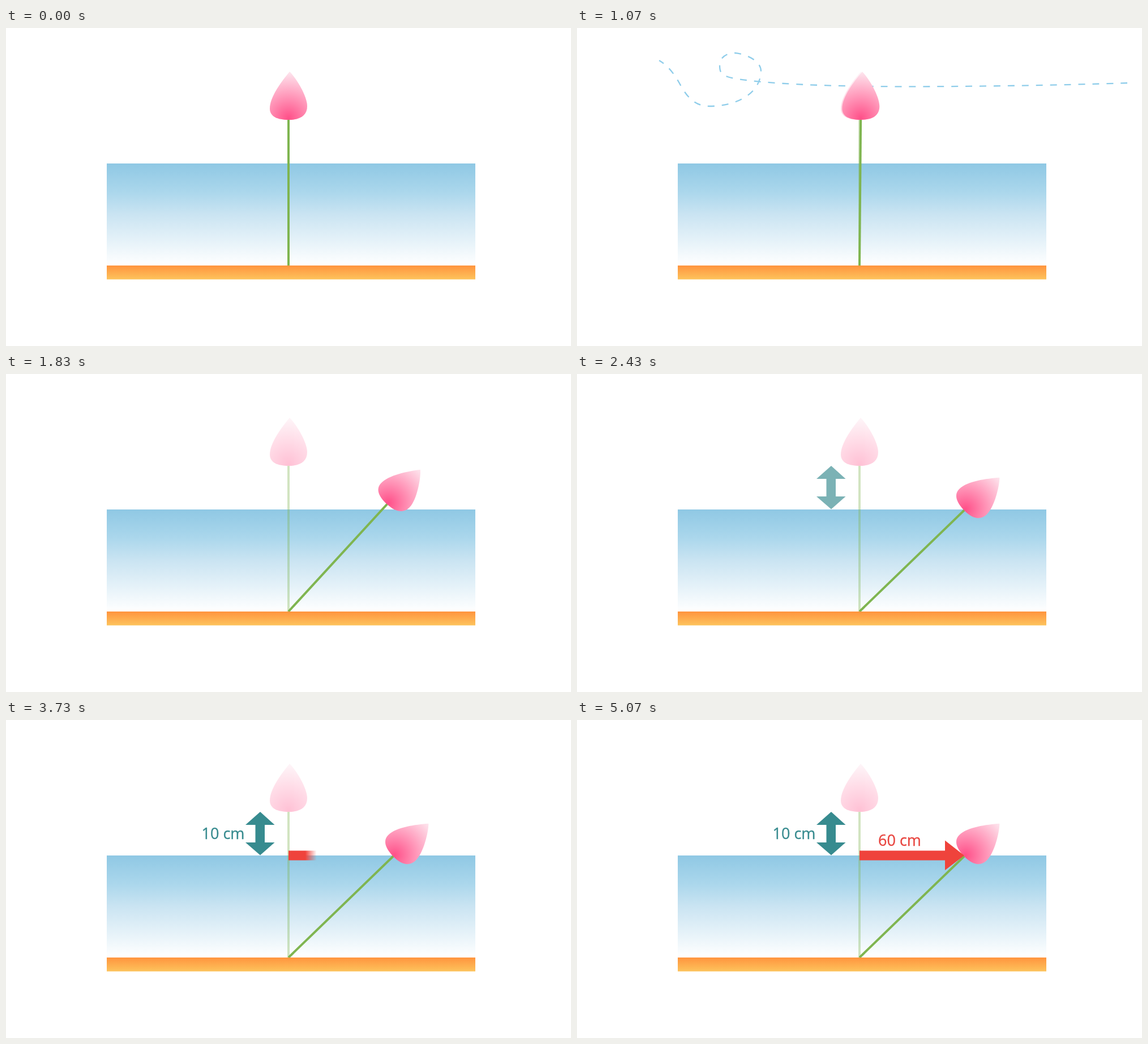
An HTML page that plays this animation: 998 by 561 pixels, repeating every 5.11 s.

```html
<!DOCTYPE html>
<html lang="en">
<head>
<meta charset="utf-8">
<title>Flower in the wind</title>
<style>
  html, body { margin: 0; width: 100%; height: 100%; overflow: hidden; background: #fff; }
  svg { display: block; width: 998px; height: 561px; }
  text { font: 27px "Open Sans", "Noto Sans", sans-serif; text-anchor: middle; stroke-width: .35; }
</style>
</head>
<body>
<svg viewBox="0 0 998 561">
  <defs>
    <linearGradient id="water" x2="0" y2="1">
      <stop offset="0" stop-color="#8fc8e4"/>
      <stop offset=".28" stop-color="#abd7ec"/>
      <stop offset=".5" stop-color="#cae4f2"/>
      <stop offset="1" stop-color="#fff"/>
    </linearGradient>
    <linearGradient id="soil" x2="0" y2="1">
      <stop offset="0" stop-color="#ff943e"/>
      <stop offset="1" stop-color="#fdc35c"/>
    </linearGradient>
    <radialGradient id="petal" gradientUnits="userSpaceOnUse" cx="499" cy="159" r="84">
      <stop offset="0" stop-color="#ff5089"/>
      <stop offset=".5" stop-color="#ff9dbd"/>
      <stop offset="1" stop-color="#fdeaf1"/>
    </radialGradient>
    <linearGradient id="edge" gradientUnits="userSpaceOnUse" y1="0" y2="0">
      <stop offset="0" stop-color="#fff"/>
      <stop offset="1" stop-color="#000"/>
    </linearGradient>
    <mask id="wipe" maskUnits="userSpaceOnUse" x="490" y="200" width="210" height="80">
      <rect x="490" y="200" width="210" height="80" fill="url(#edge)"/>
    </mask>
    <g id="plant">
      <path d="M499 161V419" stroke="#7fb550" stroke-width="4"/>
      <path fill="url(#petal)" d="M501 77C486 95 466 122 466 142C466 156 479 162 499 162C520 162 532 154 532 138C532 120 513 89 501 77Z"/>
    </g>
  </defs>

  <rect x="178" y="239" width="651" height="180" fill="url(#water)"/>
  <path id="wind" fill="none" stroke="#8fcdea" stroke-width="2.3" pathLength="1087"
    d="M143 56C163 67 175 86 184 103C196 124 210 138 234 138C278 138 324 118 325 76C325 57 296 45 278 44C262 44 252 54 252 65C252 80 256 82 266 86C295 95 400 103 570 103.3C700 103.5 850 101 972 97"/>
  <use href="#plant" opacity=".35"/>
  <use href="#plant" id="flower"/>
  <rect x="178" y="419" width="651" height="24.5" fill="url(#soil)"/>

  <path id="rise" fill="#378b8f" d="M449 162L474.5 185H457V216H474.5L449 238.5L423 216H440.5V185H423Z"/>
  <path fill="#ef433c" mask="url(#wipe)" d="M499 230.5H650V212.5L684 239L650 265V247.5H499Z"/>
  <text id="riseText" y="9.8" fill="#378b8f" stroke="#378b8f">10 cm</text>
  <text id="reachText" y="9.8" fill="#e8453f" stroke="#e8453f">60 cm</text>
</svg>
<script>
  const LOOP = 5110;
  const WIND_LENGTH = 1087, DASH = 12, PERIOD = 25;
  const el = id => document.getElementById(id);

  const progress = (t, start, length) => Math.min(1, Math.max(0, (t - start) / length));
  const ease = u => (1 - Math.cos(Math.PI * u)) / 2;

  // Shows the fixed dashes that lie between two lengths along the path.
  function trimWind(from, to) {
    const list = [0];
    let pos = 0;
    for (let s = 0; s < WIND_LENGTH; s += PERIOD) {
      const a = Math.max(s, from), b = Math.min(s + DASH, to);
      if (b <= a) continue;
      list.push(a - pos, b - a);
      pos = b;
    }
    list.push(2000);
    const wind = el("wind");
    wind.style.visibility = list.length > 2 ? "visible" : "hidden";
    wind.setAttribute("stroke-dasharray", list.join(" "));
  }

  // A label shrinks from nine times its size while it fades in.
  function dropText(id, x, y, u) {
    const scale = 1 + 8 * (1 - u) ** 4;
    const text = el(id);
    text.setAttribute("transform", `translate(${x} ${y}) scale(${scale})`);
    text.setAttribute("opacity", u);
    text.style.filter = scale > 1.5 ? `blur(${0.07 * (scale - 1)}px)` : "none";
  }

  function draw(t) {
    trimWind(WIND_LENGTH * ease(progress(t, 1056, 500)),
             WIND_LENGTH * ease(progress(t, 10, 510)));
    const angle = 46 * ease(progress(t, 1006, 1000));
    el("flower").setAttribute("transform", `rotate(${angle} 499 419)`);
    el("rise").setAttribute("opacity", progress(t, 2135, 450));
    dropText("riseText", 383.5, 200, progress(t, 2650, 700));

    const edge = 499 + 206 * progress(t, 3490, 1000);
    el("edge").setAttribute("x1", edge - 20);
    el("edge").setAttribute("x2", edge);
    dropText("reachText", 570, 212.3, progress(t, 4150, 700));
  }

  const begin = performance.now();
  function tick() {
    draw((performance.now() - begin) % LOOP);
    requestAnimationFrame(tick);
  }
  tick();
</script>
</body>
</html>
```
